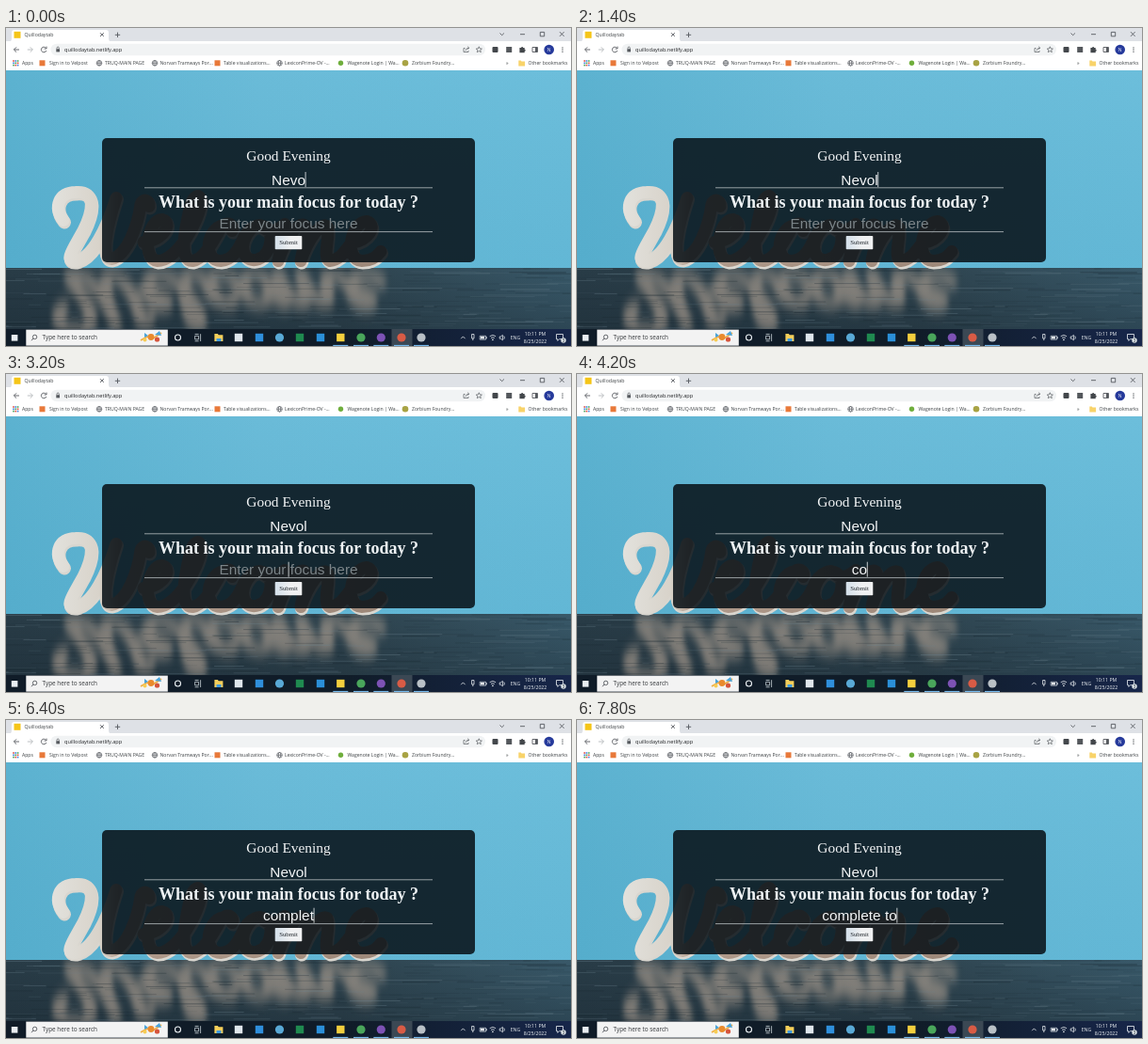
These frames come from a looping animation (600 px wide and 338 px high, 8000 ms). An HTML page:

```html
<!DOCTYPE html>
<html lang="en">
<head>
<meta charset="utf-8">
<title>New tab page</title>
<style>
html, body { margin: 0; width: 100%; height: 100%; overflow: hidden; background: #fff; }
svg { display: block; width: 100vw; height: 100vh; }
text { white-space: pre; font-family: "Open Sans", sans-serif; }
.serif { font-family: "Liberation Serif", serif; }
.field { font-family: "Liberation Sans", sans-serif; font-size: 15.4px; fill: #f4f6f7; }
.mid { text-anchor: middle; }
.ln { fill: none; stroke: #55595e; stroke-width: .9; }
.script { fill: none; stroke-linecap: round; stroke-linejoin: round; }
</style>
</head>
<body>
<svg id="stage" viewBox="0 0 600 338" preserveAspectRatio="none">
  <defs>
    <linearGradient id="wall">
      <stop offset="0" stop-color="#5cb2d0"/><stop offset=".45" stop-color="#6abbd8"/><stop offset="1" stop-color="#6cbedb"/>
    </linearGradient>
    <linearGradient id="shade" x2="0" y2="1">
      <stop offset="0" stop-color="#2583a8" stop-opacity="0"/><stop offset="1" stop-color="#2f93b8" stop-opacity=".16"/>
    </linearGradient>
    <linearGradient id="floor">
      <stop offset="0" stop-color="#2b3f4a"/><stop offset=".6" stop-color="#314752"/><stop offset="1" stop-color="#3d5f70"/>
    </linearGradient>
    <linearGradient id="dusk" x2="0" y2="1">
      <stop offset="0" stop-color="#14212b" stop-opacity=".1"/><stop offset="1" stop-color="#14212b" stop-opacity=".4"/>
    </linearGradient>
    <linearGradient id="face" gradientUnits="userSpaceOnUse" x1="50" x2="400" y1="0" y2="0">
      <stop offset="0" stop-color="#e2e1dc"/><stop offset=".14" stop-color="#d8d3ca"/><stop offset=".2" stop-color="#b09b8c"/><stop offset="1" stop-color="#9c8778"/>
    </linearGradient>
    <linearGradient id="btn"><stop offset="0" stop-color="#d3dfe9"/><stop offset=".6" stop-color="#f0f1f2"/></linearGradient>
    <linearGradient id="bar"><stop offset=".6" stop-color="#101c28"/><stop offset="1" stop-color="#17264a"/></linearGradient>
    <filter id="smear" x="-10%" y="-40%" width="120%" height="180%"><feGaussianBlur stdDeviation="2.5 9"/></filter>
    <clipPath id="ground"><rect y="255" width="600" height="66"/></clipPath>
    <g id="word">
      <path d="M61 206C50 192 56 176 74 176C97 174 92 197 82 217C71 237 61 250 74 249C92 246 107 214 117 182C108 209 99 247 112 247C129 243 140 211 143 189C145 182 153 184 152 191"/>
      <path d="M146 229C167 228 178 208 166 205C151 204 143 247 161 249C181 249 205 208 207 187C207 176 198 178 195 194C189 219 184 249 198 249C210 247 219 230 228 214C235 205 243 211 240 217"/>
      <path d="M228 212C211 220 211 249 228 249C241 248 247 237 253 223C262 207 282 207 281 227C279 249 258 254 253 241C248 229 259 211 270 211C281 222 288 216 296 210C297 221 291 237 289 249C297 225 309 208 317 211C322 217 315 237 313 249C321 225 334 208 341 212C345 222 335 246 344 249C356 248 361 236 367 230C385 228 395 211 383 207C365 208 359 248 378 249C390 249 395 243 398 239"/>
    </g>
  </defs>

  <rect y="45" width="600" height="211" fill="url(#wall)"/>
  <rect y="45" width="600" height="211" fill="url(#shade)"/>
  <g clip-path="url(#ground)">
    <rect y="255" width="600" height="66" fill="url(#floor)"/>
    <rect y="255" width="600" height="66" fill="url(#dusk)"/>
    <g transform="translate(0 461) scale(1 -.8)" opacity=".62">
      <use href="#word" class="script" stroke="#b5a596" stroke-width="14" filter="url(#smear)"/>
    </g>
    <g id="grain"></g>
  </g>
  <use href="#word" class="script" stroke="#d9d6cf" stroke-width="14" x="1" y=".5"/>
  <use href="#word" class="script" stroke="url(#face)" stroke-width="13" y="-1.5"/>

  <rect x="102" y="117" width="396" height="132" rx="5" fill="#070f15" fill-opacity=".85"/>
  <path d="M147 169.8H453M147 216.6H453" stroke="#b9c0c3" stroke-width=".8"/>
  <text class="serif mid" x="300" y="141" font-size="15.4" fill="#f3f5f6">Good Evening</text>
  <text class="field mid" id="name" x="300" y="166.5"></text>
  <text class="serif mid" x="300" y="190.8" font-size="18" font-weight="700" fill="#eef2f4">What is your main focus for today ?</text>
  <text class="field mid" id="focus" x="300" y="213.2"></text>
  <text class="field mid" id="hint" x="300" y="213.2" style="fill:#7c8589">Enter your focus here</text>
  <rect id="caret" width=".8" height="16" fill="#eef1f2"/>
  <rect x="285.7" y="221" width="28.6" height="14.3" rx=".8" fill="url(#btn)"/>
  <text class="serif mid" x="300" y="230.4" font-size="6.8" fill="#20262c">Submit</text>

  <rect width="600" height="14.5" fill="#dee1e6"/>
  <path d="M3 14.5Q6 14.5 6 11V5Q6 2 9 2H106Q109 2 109 5V11Q109 14.5 112 14.5Z" fill="#fff"/>
  <rect y="14" width="600" height="31" fill="#fff"/>
  <rect x="8.5" y="3.8" width="7" height="7" fill="#f5c518"/>
  <text x="19.5" y="9.3" font-size="5.2" fill="#3c4043">Quillodaytab</text>
  <path class="ln" d="M100 5.2l3.8 3.8m0-3.8l-3.8 3.8M115.8 7.3h5.4m-2.7-2.7v5.4M524.5 5.5l2.2 2.2 2.2-2.2M546 6.7h5M567.3 4.4h4.4v4.4h-4.4ZM588 4.2l4.6 4.6m0-4.6l-4.6 4.6"/>
  <path class="ln" d="M14 23H8.5m2.6-2.7L8.4 23l2.7 2.7"/>
  <path class="ln" style="stroke:#b5b8bb" d="M22.8 23h5.5m-2.6-2.7l2.7 2.7-2.7 2.7"/>
  <path class="ln" d="M42.4 21.3A2.8 2.8 0 1 0 42.8 24M43 19.6v2.4h-2.4"/>
  <rect x="47.5" y="16.8" width="461.5" height="12.4" rx="6.2" fill="#f1f3f4"/>
  <path d="M53.3 22.2h3.7v3.2h-3.7Z" fill="#55595e"/>
  <path class="ln" style="stroke-width:.7" d="M54 22.2v-1a1.15 1.15 0 0 1 2.3 0v1"/>
  <text x="62" y="25" font-size="5.6" fill="#202124">quillodaytab.netlify.app</text>
  <path class="ln" style="stroke-width:.7" d="M487.5 21.5h-1.5v4h5v-1.5m-3 .2q.4-3 3.7-3m-1.5-1.5l1.6 1.5-1.6 1.5M502.3 19.8l.9 2.1 2.2.2-1.7 1.4.6 2.2-2-1.2-2 1.2.6-2.2-1.7-1.4 2.2-.2Z"/>
  <rect x="516.5" y="20" width="6" height="6" rx="1" fill="#43474b"/>
  <rect x="531.2" y="20" width="6" height="6" fill="#54585c"/>
  <path d="M545.4 21h1.7a1 1 0 0 1 2 0h1.6v1.8a1 1 0 0 1 0 2v1.4h-5.3Z" fill="#43474b"/>
  <path class="ln" d="M559 20.5h5.4v5H559Z"/><rect x="562" y="20.5" width="2.4" height="5" fill="#55595e"/>
  <circle cx="576.7" cy="23" r="5.3" fill="#263a9b"/>
  <text class="mid" x="576.7" y="24.9" font-size="5" fill="#fff">N</text>
  <path d="M591 20.8v.1m0 2.1v.1m0 2.1v.1" stroke="#4b4f54" stroke-width="1.3" stroke-linecap="round"/>
  <g id="marks"></g>
  <path d="M544.3 34.6h2.4l.8.9h3.6v5h-6.8Z" fill="#f8d36a"/>

  <rect y="320" width="600" height="18" fill="url(#bar)"/>
  <rect x="5.8" y="326" width="6.6" height="6.6" fill="#e9eef2"/>
  <rect x="21.3" y="320.6" width="150.5" height="17" fill="#f3f3f3"/>
  <circle class="ln" cx="30.6" cy="328.4" r="2.2"/><path class="ln" d="M29 330l-2 2.2"/>
  <text x="38.5" y="331.4" font-size="6.4" fill="#35383b">Type here to search</text>
  <g>
    <path d="M143 332l7-4 6 2 9-6" fill="none" stroke="#f1b049" stroke-width="2"/>
    <path d="M147 324l4 3-4 2ZM158 326l5-4 2 5Z" fill="#4aa3d9"/>
    <circle cx="154" cy="328.5" r="3.4" fill="#e98a2d"/><circle cx="160.5" cy="331" r="2.6" fill="#d6543c"/>
    <circle cx="147.5" cy="331.5" r="2" fill="#f6cd55"/>
  </g>
  <circle cx="182.5" cy="329" r="3" fill="none" stroke="#eef2f5" stroke-width="1.1"/>
  <path d="M200.6 327.3h4v3.6h-4ZM200.6 325.4h4M200.6 332.8h4M206.6 325.2v7.8" fill="none" stroke="#cbd3d9" stroke-width=".8"/>
  <path d="M221.4 325h3.4l1 1.2h4.6v6.8h-9Z" fill="#f6cf5b"/><path d="M223.5 330h5v3h-5Z" fill="#3f9be0"/>
  <rect x="409.5" y="320" width="22" height="18" fill="#3b4854"/>
  <g id="apps"></g>
  <path d="M483.2 330.2l2.2-2.3 2.2 2.3M513.7 327.7q3.2-2.6 6.4 0M515 329.5q1.9-1.5 3.8 0M524.2 328h1.2l2-1.6v5.4l-2-1.6h-1.2ZM528.8 327.4q1.2 1.7 0 3.4" fill="none" stroke="#e6ebef" stroke-width=".8"/>
  <circle cx="516.9" cy="331.4" r=".8" fill="#e6ebef"/>
  <path d="M494.6 325.5h2.4v4.4h-2.4ZM495.8 329.9v2.2" stroke="#e6ebef" stroke-width=".8" fill="none"/>
  <path d="M503.2 327.3h6.4v3.8h-6.4Zm6.4 1.2h.8v1.4h-.8" stroke="#e6ebef" stroke-width=".7" fill="none"/>
  <rect x="504" y="328" width="4" height="2.4" fill="#e6ebef"/>
  <g fill="#eef2f5" font-size="5.2" class="mid">
    <text x="541" y="331.2">ENG</text>
    <text x="562" y="327.1">10:11 PM</text>
    <text x="562" y="335.2">8/25/2022</text>
  </g>
  <path d="M584.5 325.5h7v5.2h-4l-1.7 1.7v-1.7h-1.3Z" fill="none" stroke="#eef2f5" stroke-width=".8"/>
  <circle cx="592" cy="332" r="2.7" fill="#dfe5e9"/>
  <text class="mid" x="592" y="333.6" font-size="4.4" fill="#17232e">3</text>
</svg>
<script>
const $ = id => document.getElementById(id);
const add = (id, markup) => $(id).insertAdjacentHTML("beforeend", markup);
const box = (x, y, s, fill) => `<rect x="${x - s / 2}" y="${y - s / 2}" width="${s}" height="${s}" fill="${fill}"/>`;
const dot = (x, y, r, fill) => `<circle cx="${x}" cy="${y}" r="${r}" fill="${fill}"/>`;
const globe = x => `<g fill="none" stroke="#565b60" stroke-width=".7"><circle cx="${x}" cy="37.3" r="2.8"/>
  <ellipse cx="${x}" cy="37.3" rx="1.2" ry="2.8"/><path d="M${x - 2.8} 37.3h5.6"/></g>`;
const label = (x, s) => `<text x="${x}" y="39.1" font-size="5.1" fill="#3c4043">${s}</text>`;

// Wood grain
let seed = 7;
const rnd = () => (seed = seed * 16807 % 2147483647) / 2147483647;
let grain = "";
for (let i = 0; i < 240; i++) {
  const y = 256 + 64 * rnd(), x = 640 * rnd() - 40, w = 10 + 60 * rnd();
  grain += `<path d="M${x} ${y}h${w}" stroke="${rnd() < .6 ? "#16242d" : "#6d8490"}" stroke-width="${.4 + .8 * rnd()}" opacity="${.1 + .25 * rnd()}"/>`;
}
add("grain", grain);

// Bookmark bar
const gridColors = ["#e04a3f", "#3f7de0", "#44a35a"];
for (let i = 0; i < 9; i++)
  add("marks", box(8 + i % 3 * 2.3, 35 + (i / 3 | 0) * 2.3, 1.6, gridColors[(i + (i / 3 | 0)) % 3]));
add("marks", label(17, "Apps") +
  box(38.5, 37.3, 6, "#e8793a") + label(46, "Sign in to Velpost") +
  globe(99) + label(105, "TRUQ-MAIN PAGE") +
  globe(158) + label(163.5, "Norvan Tramways Por...") +
  box(224.5, 37.3, 6, "#e8793a") + label(231, "Table visualizations...") +
  globe(290.5) + label(296, "LexiconPrime-OV -...") +
  dot(355.5, 37.3, 2.7, "#6fae3c") + label(362.5, "Wagenote Login | Wa...") +
  dot(424, 37.3, 3.3, "#a8a344") + label(431, "Zorbium Foundry...") +
  label(531, "»") + label(554.5, "Other bookmarks"));

// Taskbar
const apps = [
  [247, "#dfe6ec", box], [269, "#2f8fdc", box], [290.5, "#59a9d6", dot], [312, "#1f8a50", box],
  [334, "#2b8fd8", box], [355.3, "#f4cf3d", box, 1], [377, "#4aa65b", dot, 1],
  [398.3, "#7d52b5", dot, 1], [420, "#d95b45", dot, 1], [441, "#b9c0c6", dot, 1]
];
for (const [x, color, shape, open] of apps) {
  add("apps", shape(x, 329, shape === dot ? 4.6 : 8.4, color));
  if (open) add("apps", `<rect x="${x - 8}" y="336.9" width="16" height="1.1" fill="#76b9ed"/>`);
}

// Typing: [ms, field, text]
const LOOP = 8000, STEP = 200, BLINK = 500;
const keys = [
  [0, "name", "Nevo"], [400, "name", "Nevol"], [2800, "focus", ""],
  [3800, "focus", "c"], [4000, "focus", "co"], [4400, "focus", "com"],
  [5600, "focus", "comp"], [5800, "focus", "compl"], [6000, "focus", "comple"],
  [6200, "focus", "complet"], [6600, "focus", "complete"], [6800, "focus", "complete "],
  [7400, "focus", "complete t"], [7600, "focus", "complete to"]
];

function draw(ms) {
  const t = Math.floor(ms % LOOP / STEP) * STEP;
  const past = keys.filter(k => k[0] <= t);
  const value = { name: "", focus: "" };
  for (const [, field, s] of past) value[field] = s;
  for (const field in value) $(field).textContent = value[field];
  $("hint").style.display = value.focus ? "none" : "";

  const [since, active] = past[past.length - 1];
  const caret = $("caret");
  const width = value[active] ? $(active).getComputedTextLength() : 0;
  caret.setAttribute("x", 300 + width / 2 - .3);
  caret.setAttribute("y", active === "name" ? 153 : 199.7);
  caret.style.display = (t - since) % (2 * BLINK) < BLINK ? "" : "none";
}

const start = performance.now();
function tick() {
  draw(performance.now() - start);
  requestAnimationFrame(tick);
}
tick();
</script>
</body>
</html>
```
